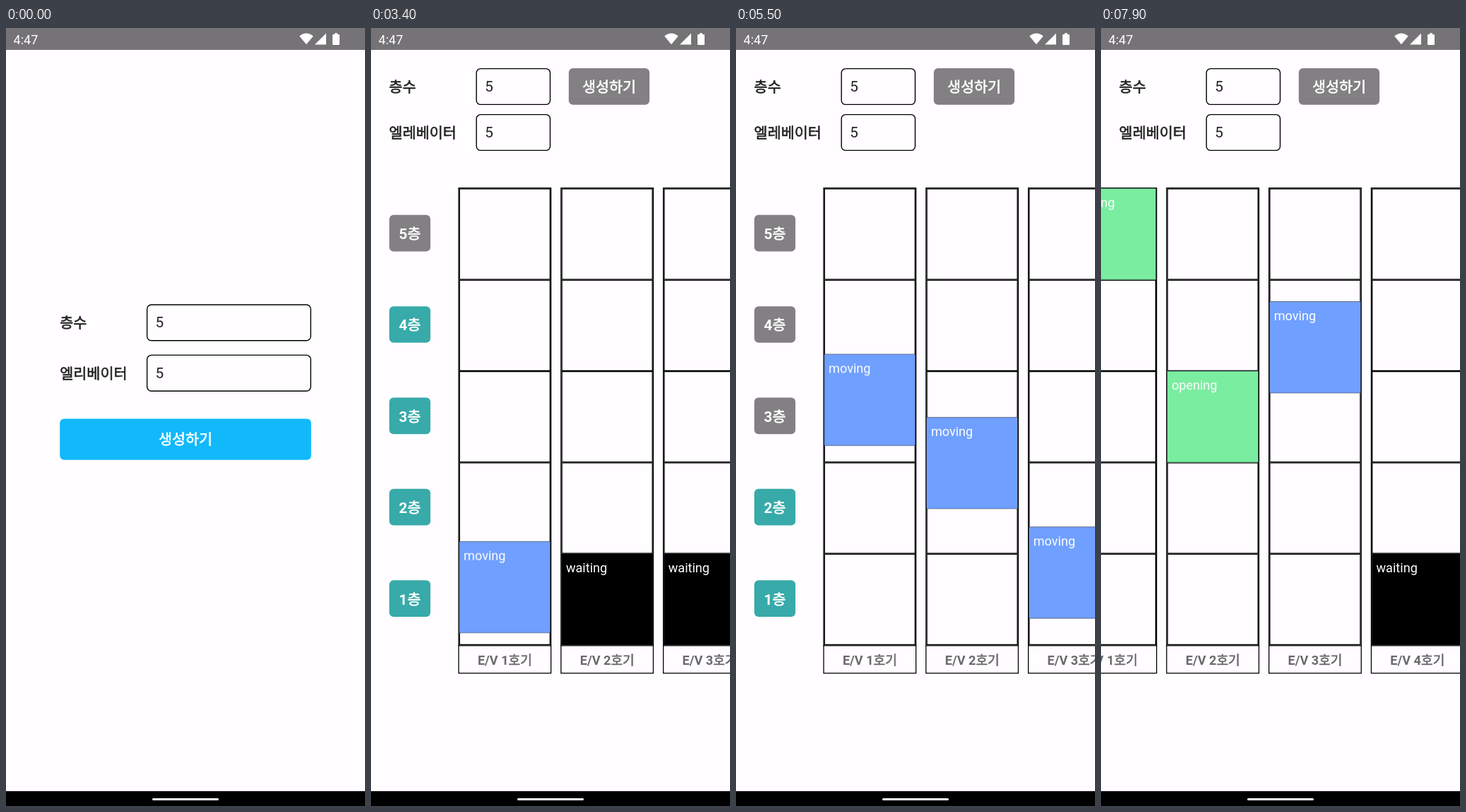
Animation of 508 by 1102 pixels, one loop 8000 ms. Source, as an HTML page:

```html
<!DOCTYPE html>
<html lang="ko">
<head>
<meta charset="utf-8">
<title>Elevator</title>
<style>
html, body { margin: 0; width: 100%; height: 100%; overflow: hidden; background: #fffdff; }
svg { display: block; width: 100%; height: 100%; }
text { font: 18.1px Roboto, "Noto Sans CJK KR", "Noto Sans CJK", sans-serif; fill: #fff; white-space: pre; }
.big { font-size: 20.7px; }
.dark { fill: #222; }
.mid { text-anchor: middle; }
.bold { font-weight: 700; }
.ko { font-weight: 400; stroke: #fff; stroke-width: .6; }
.dark.ko { stroke: #222; }
.unit, .unit .ko { fill: #6b696c; }
.unit .ko { stroke: #6b696c; }
.field { fill: none; stroke: #000; stroke-width: 1.4; }
.line { fill: none; stroke: #000; stroke-width: 1.3; }
</style>
</head>
<body>
<svg id="stage" viewBox="0 0 508 1102" xmlns="http://www.w3.org/2000/svg"></svg>
<script>
const LOOP = 8000, CELL = 129.35, TOP = 227.3, STEP = 1026;
const BLUE = '#11b9fb', GRAY = '#828082', TEAL = '#38aaa9';
const IN = 'cubic-bezier(.42,0,1,1)', OUT = 'cubic-bezier(0,0,.58,1)';
const stage = document.getElementById('stage');

const rect = (x, y, w, h, attrs = '') => `<rect x="${x}" y="${y}" width="${w}" height="${h}" ${attrs}/>`;
const text = (x, y, cls, s) => `<text x="${x}" y="${y}" class="${cls}">${s}</text>`;
const ko = s => `<tspan class="ko">${s}</tspan>`;
const field = (x, y, w) => rect(x, y, w, 50.8, 'rx="6" class="field"') + text(x + 12, y + 32.3, 'big dark', '5');
const list = (n, fn) => Array.from({ length: n }, (_, i) => fn(i)).join('');

const form = `<g id="form">
  ${text(76.3, 425.4, 'big dark ko', '층수')}
  ${text(76.3, 496.8, 'big dark ko', '엘리베이터')}
  ${field(199.6, 392, 231.6)}${field(199.6, 463.4, 231.6)}
  ${rect(76.2, 553.5, 355.6, 58.2, `rx="6" fill="${BLUE}"`)}
  ${text(254, 590.3, 'big mid ko', '생성하기')}
</g>`;

const floorButton = i => {
  const y = 264.8 + i * CELL;
  return rect(25.9, y, 58.2, 51.7, `rx="6" fill="${TEAL}" id="floor${5 - i}"`) +
    text(55, y + 34.3, 'big mid bold', 5 - i + ko('층'));
};

const carState = (name, fill) => `<g class="${name}" opacity="0">
  ${rect(.2, 0, 128.9, CELL, `fill="${fill}" stroke="#223" stroke-width=".6"`)}
  ${text(6.4, 26.5, '', name)}</g>`;

const shaft = i => `<g transform="translate(${123.4 + i * 144.8} 0)">
  ${rect(.65, 226.6, 130.6, 687.3, 'class="line"')}
  ${list(5, r => rect(1.95, TOP + .65 + r * CELL, 128, CELL - 1.3, 'class="line"'))}
  <path d="M0 874.8H131.9" class="line"/>
  ${text(66, 902, 'mid bold unit', `E/V ${i + 1}${ko('호기')}`)}
  <g transform="translate(1.3 ${TOP + 4 * CELL})"><g id="car${i + 1}">
    ${carState('waiting', '#000')}${carState('moving', '#6f9fff')}${carState('opening', '#7aeda0')}
  </g></g>
</g>`;

const building = `<g id="building" opacity="0">
  ${text(25.6, 91.3, 'big dark ko', '층수')}
  ${text(25.6, 156, 'big dark ko', '엘레베이터')}
  ${field(149.2, 57.6, 104.3)}${field(149.2, 122.6, 104.3)}
  ${rect(279.8, 57, 114.3, 51.8, `rx="6" fill="${BLUE}" id="create"`)}
  ${text(337, 91.3, 'big mid ko', '생성하기')}
  <g id="scroll">${list(5, floorButton)}${list(5, shaft)}</g>
</g>`;

const bars = `${rect(0, 0, 508, 31, 'fill="#757376"')}
  ${text(10.5, 22.6, '', '4:47')}
  <path fill="#fff" d="M425 23.3L415.2 11.6Q425 3.2 434.8 11.6ZM437 23.5L453 7.5V23.5ZM465 7.3h4v1.7h2q1 0 1 1v13q0 1-1 1h-8q-1 0-1-1v-13q0-1 1-1h2z"/>
  ${rect(0, 1081, 508, 21)}
  ${rect(207, 1091, 94, 3, 'rx="1.5" fill="#fff"')}`;

stage.innerHTML = rect(0, 0, 508, 1102, 'fill="#fffdff"') + form + building + bars;

// keys: [time in ms, value, easing to the next key]
function play(sel, prop, keys) {
  const all = [[0, keys[0][1]], ...keys, [LOOP, keys.at(-1)[1]]];
  stage.querySelector(sel).animate(
    all.map(([t, v, easing = 'linear']) => ({ offset: t / LOOP, [prop]: v, easing })),
    { duration: LOOP, iterations: Infinity });
}
const swap = (sel, prop, a, b, at) => play(sel, prop, [[at, a], [at, b]]);
const show = (sel, from, to) => play(sel, 'opacity',
  [...(from ? [[from, 0]] : []), [from, 1], ...(to < LOOP ? [[to, 1], [to, 0]] : [])]);

// Each floor eases in and out on its own; rest is the height reached when the loop cuts the ride.
function ride(n, start, floors, openAt, rest) {
  const keys = [];
  for (let i = 0; i <= floors * 2; i++) {
    const t = start + i * STEP / 2;
    const cut = rest && t + STEP / 2 > LOOP;
    if (t < LOOP) keys.push([t, `translateY(${-i * CELL / 2}px)`, cut ? 'linear' : i % 2 ? OUT : IN]);
  }
  if (rest) keys.push([LOOP, `translateY(${-rest * CELL}px)`]);
  play(`#car${n}`, 'transform', keys);
  show(`#car${n} .waiting`, 0, start);
  show(`#car${n} .moving`, start, openAt);
  if (openAt < LOOP) show(`#car${n} .opening`, openAt, LOOP);
}

show('#form', 0, 2000);
show('#building', 2000, LOOP);
swap('#create', 'fill', BLUE, GRAY, 2900);
swap('#floor5', 'fill', TEAL, GRAY, 2900);
swap('#floor3', 'fill', TEAL, GRAY, 3800);
swap('#floor4', 'fill', TEAL, GRAY, 4900);
ride(1, 3168, 4, 7350);
ride(2, 3966, 2, 6030);
ride(3, 5130, 3, LOOP, 2.885);
show('#car4 .waiting', 0, LOOP);
show('#car5 .waiting', 0, LOOP);
play('#scroll', 'transform', [
  [5550, 'translateX(0px)', 'cubic-bezier(.4,0,.8,.75)'],
  [6100, 'translateX(-111px)', 'cubic-bezier(.2,.45,.5,1)'],
  [6650, 'translateX(-176px)']]);
</script>
</body>
</html>
```
